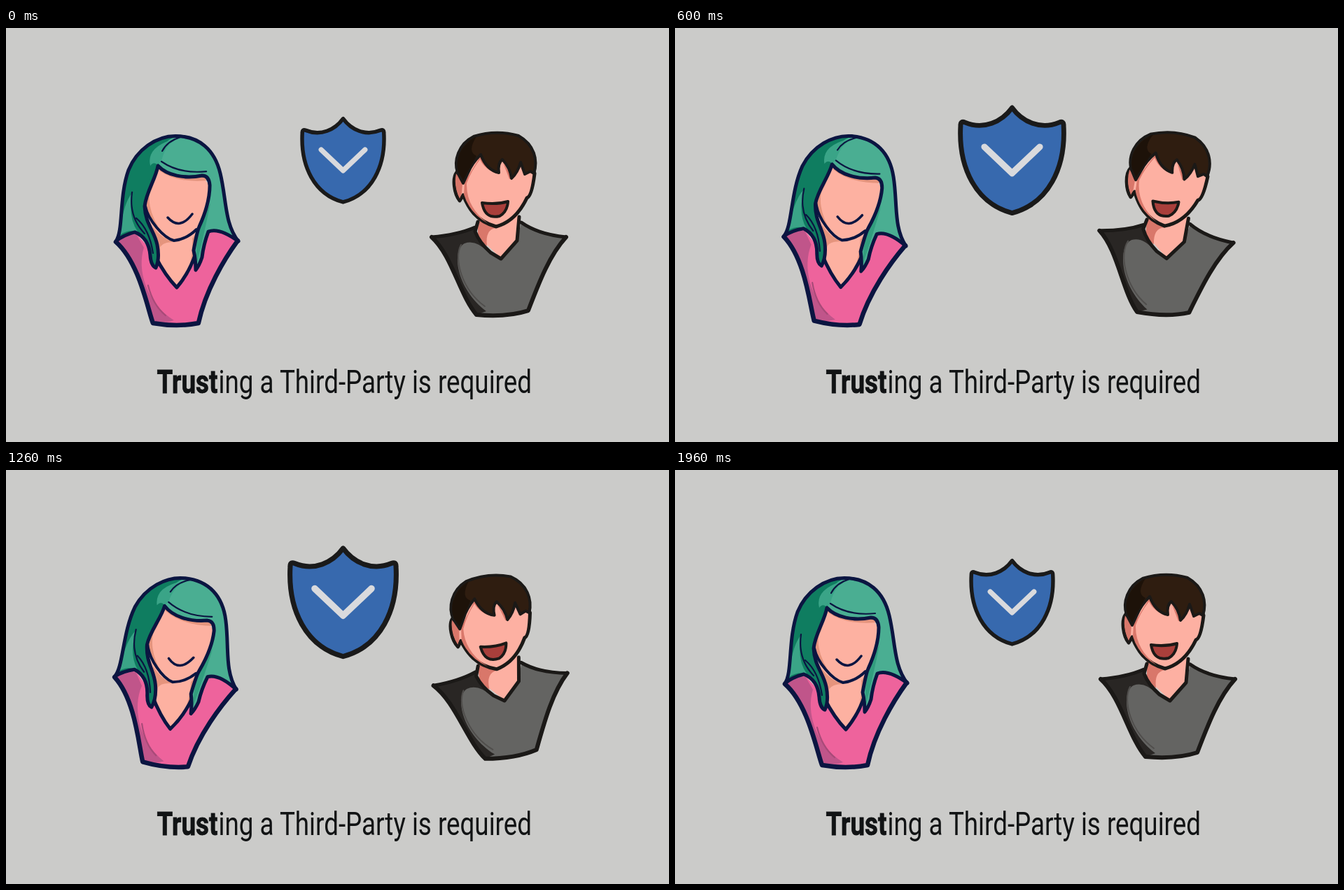
These frames come from a looping animation (947x592 px, 2000 ms). An HTML page:

```html
<!DOCTYPE html>
<html lang="en">
<head>
<meta charset="utf-8">
<title>Trust</title>
<style>
html, body { margin: 0; width: 100%; height: 100%; overflow: hidden; background: #cbcbc9; }
svg { display: block; width: 947px; height: 592px; }
path { stroke-linecap: round; stroke-linejoin: round; }
.line { fill: none; }
.navy { stroke: #0b1541; stroke-width: 5; }
.ink { stroke: #1b1917; stroke-width: 5; }
.thin { stroke-width: 2.2; }
text { font: 46px Roboto, Arial, sans-serif; fill: #111314; }
.bold { font-weight: 700; stroke: #111314; stroke-width: .8; }
</style>
</head>
<body>
<svg viewBox="0 0 947 592">
  <defs>
    <path id="hair" d="M157 305 C168 290 161 242 175 203 C187 174 214 154.500 242 154.500 C276 154.500 298 174 306 208 C315 245 312 280 332 305 Q305 285 289 291 Q282 310 280 328 Q276 340 271 346 Q271 330 268 318 Q273 290 276 284 C286 262 291 240 291 225 Q290 211 280 211 C255 216 230 211 217 197 C214 215 200 235 198 255 C199 280 212 290 216 310 Q220 330 214 343 Q207 340 206 325 Q204 300 184 292 Q168 296 157 305Z"/>
  </defs>
  <g id="woman">
    <path fill="#fdb1a1" d="M205 270 L214 325 Q228 355 244 371 Q262 350 272 318 L276 270Z"/>
    <path fill="#e5947d" d="M210 285 Q224 302 240 306 Q224 306 220 314 L218 332 L212 315Z M273 292 L266 301 Q267 320 263 338 L272 318Z"/>
    <path fill="#ee639c" d="M157 306 Q168 296 184 292 L214 325 Q228 355 244 371 Q262 350 272 318 L290 289 Q310 288 331 304 C312 330 285 375 275 422 Q245 428 210 422 C202 400 190 335 157 306Z"/>
    <path fill="#c0558a" d="M158 305 Q170 295 186 295 L197 314 C187 345 200 393 240 418 Q226 423 210 421 C202 398 190 335 158 305Z"/>
    <path class="line thin" stroke="#a84a78" d="M203 368 Q210 396 228 411"/>
    <path class="line navy" d="M213 326 Q228 355 244 371 Q262 350 271 322"/>
    <path class="line navy" style="stroke-width:6.5" d="M157 306 C190 335 202 400 210 422 Q245 428 275 422 C285 375 312 330 331 304"/>
    <path fill="#fdb1a1" d="M217 197 C230 212 255 216 280 213 L291 225 C290 250 280 275 270 291 Q258 302 240 304 C222 298 203 275 198 252Z"/>
    <path fill="#e5947d" d="M217 197 Q213 222 205 238 Q202 265 226 297 Q200 275 198 252Z M217 198 Q240 213 284 212 L289 218 Q244 222 219 204Z"/>
    <path class="line navy" style="stroke-width:4" d="M199 255 C203 275 225 300 240 304 Q258 302 272 288"/>
    <path class="line navy" style="stroke-width:3.500" d="M231 271 Q248 290 266 266"/>
    <use href="#hair" fill="#4aae92"/>
    <path fill="#0f7d60" d="M242 155 Q222 164 222 178 L217 197 C214 215 200 235 198 255 C199 280 212 290 216 310 Q220 330 214 343 Q207 340 206 325 Q204 300 184 292 Q168 296 157 305 C168 290 161 242 175 203 C187 174 214 154.500 242 155Z"/>
    <path fill="#3aa487" d="M206 197 Q200 172 236 160 L246 159 Q228 164 222 190 L217 196 Q211 190 206 197Z M163 292 Q167 252 180 236 Q174 272 188 291 Q174 288 163 296Z"/>
    <path fill="#329d7e" d="M276 284 Q287 262 292 250 Q285 286 273 335 Q270 310 276 284Z"/>
    <path class="line navy thin" d="M180 235 Q175 270 198 294 M249 156 Q230 162 223 176 M222 191 Q248 209 286 205 M186 272 Q205 288 210 322"/>
    <use href="#hair" class="line navy"/>
  </g>
  <g id="man">
    <path fill="#fdb0a2" d="M674 270 L676 300 L707 329 L730 303 L733 268Z"/>
    <path fill="#d9776a" d="M674 272 Q686 283 700 286 Q684 288 687 312 L674 301Z"/>
    <path fill="#646462" d="M608 299 Q645 296 670 285 L672 298 L692 321 L707 330 L730 304 L736 278 Q760 295 800 299 C776 325 761 365 746 404 Q715 414 672 410 C648 382 637 325 608 299Z"/>
    <path fill="#292624" d="M608 299 Q645 296 670 285 L672 300 L690 322 Q672 302 655 308 C636 318 643 372 686 405 L672 410 C648 382 637 325 608 299Z"/>
    <path class="line" stroke="#504e4c" stroke-width="2" d="M650 310 C639 330 651 374 684 398"/>
    <path class="line ink" d="M608 299 Q645 296 670 285 M736 278 Q760 295 800 299 M674 277 L670 291 Q676 307 692 321 L707 330 L730 304 L733 270"/>
    <path class="line ink" style="stroke-width:6" d="M608 299 C637 325 648 382 672 410 Q715 414 746 404 C761 365 776 325 800 299"/>
    <path class="ink" fill="#fdb0a2" d="M644 206 C637 215 640 237 648 247 L653 239 C660 257 671 276 700 284 C722 278 735 262 744 243 Q751 241 755 208 L740 170 L665 170Z"/>
    <path fill="#d9776a" d="M643 208 Q639 226 648 244 L651 236 L652 222Z M655 220 L678 183 L702 208 Q684 203 677 188 Q664 205 658 222 Q657 256 688 279 Q662 265 654 238Z M709 190 L723 215 L719 216Z"/>
    <path fill="#2f1d10" class="ink" style="stroke-width:4" d="M645 207 C639 190 646 166 668 155 Q700 145 732 154 C755 167 760 189 754 208 L749 205 L741 209 L735 192 Q731 207 722 215 Q720 200 709 188 Q702 193 704 207 Q686 203 678 181 Q665 194 660 207 L653 222Z"/>
    <path fill="#1d1209" d="M646 206 C641 188 650 166 672 155 Q658 177 672 183 L660 205 L653 218Z"/>
    <path class="ink" style="stroke-width:4" fill="#a93f3b" d="M680 250 Q700 253 717 248 Q716 263 705 269 Q684 274 680 250Z"/>
  </g>
  <g id="shield">
    <path fill="#3769ae" stroke="#1a1a1a" stroke-width="7.5" d="M0 -82 C-16 -60 -44 -47 -73 -59 Q-80 -62 -80 -55 C-84 12 -56 67 0 82 C56 67 84 12 80 -55 Q80 -62 73 -59 C44 -47 16 -60 0 -82Z"/>
    <path class="line" stroke="#d9dadd" stroke-width="10" d="M-43 -21 L0 20 L43 -21"/>
  </g>
  <g transform="translate(215.500 522) scale(.799 1)">
    <text><tspan class="bold">Trust</tspan><tspan dx="1.5">ing a Third-Party is required</tspan></text>
  </g>
</svg>
<script>
const LOOP = 2000, STEPS = 60;
const woman = document.getElementById('woman');
const man = document.getElementById('man');
const shield = document.getElementById('shield');

const ease = u => (1 - Math.cos(Math.PI * u)) / 2;

// Keys are [phase, value] pairs, eased between neighbours.
function at(keys, p) {
  const i = Math.max(1, keys.findIndex(k => k[0] >= p));
  const [p0, v0] = keys[i - 1], [p1, v1] = keys[i];
  return v0 + (v1 - v0) * ease((p - p0) / (p1 - p0));
}

const womanTilt = [[0, 0], [.25, 5.7], [.5, 0], [.75, 9.5], [1, 0]];
const manTilt = [[0, 0], [1 / 3, 5.2], [2 / 3, -5.4], [1, 0]];
const shieldSize = [[0, .727], [.5, 1], [1, .727]];

function draw(now) {
  const step = Math.floor((now % LOOP + 7) * STEPS / LOOP) % STEPS;
  const p = (step + 1) / STEPS;
  woman.setAttribute('transform', `rotate(${at(womanTilt, p)} 246 284)`);
  man.setAttribute('transform', `rotate(${at(manTilt, p)} 709 276)`);
  shield.setAttribute('transform', `translate(481.5 189.3) scale(${at(shieldSize, p)})`);
}

const start = performance.now();
function tick() {
  draw(performance.now() - start);
  requestAnimationFrame(tick);
}
tick();
</script>
</body>
</html>
```
